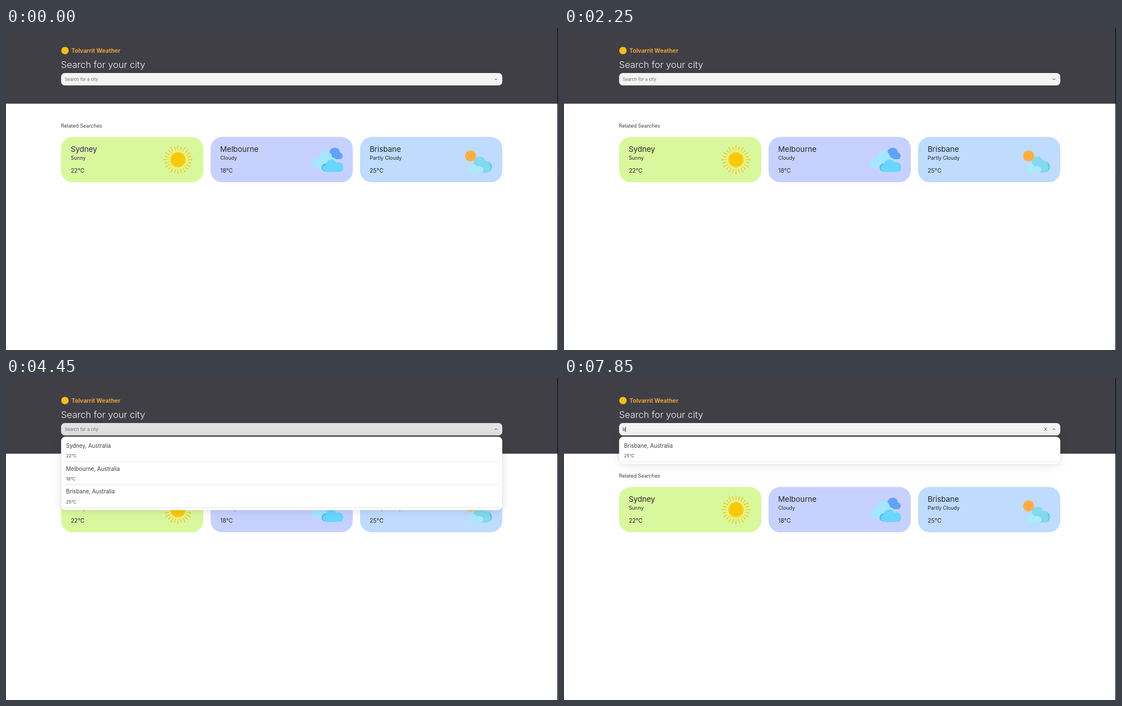
Recreate the animation shown at these times as an HTML page. Size 979 px wide and 572 px high, loop 8000 ms.

```html
<!DOCTYPE html>
<html lang="en">
<head>
<meta charset="utf-8">
<title>City weather search</title>
<style>
  html, body { margin: 0; width: 100%; height: 100%; overflow: hidden; background: #fff; }
  svg { display: block; width: 979px; height: 572px; font-family: Inter, sans-serif; fill: #27272a; }
  .brand { font-size: 10.2px; font-weight: 700; fill: #e9a23b; }
  .title { font-size: 16.4px; font-weight: 300; fill: #f4f4f5; }
  .field { font-size: 7.7px; }
  .hint { fill: #71717a; }
  .related { font-size: 8.85px; fill: #3f3f46; }
  .city { font-size: 13.35px; }
  .sky { font-size: 8.92px; }
  .temp { font-size: 10.2px; }
  .option { font-size: 9.75px; fill: #3f3f46; }
  .option-temp { font-size: 7.75px; fill: #3f3f46; }
  .rule { stroke: #e6e7ec; }
  .icon { fill: none; stroke: #3f3f46; stroke-linecap: round; stroke-linejoin: round; }
  .panel { fill: #fff; filter: drop-shadow(0 0 5px #00000008) drop-shadow(0 1px 9px #00000016) drop-shadow(0 0 .5px #0000004d); }
  #list, #match, #clear, #typed, #caret, #cursor { opacity: 0; }
  #list { transform-origin: 489px 104px; }
  #chevron { transform-origin: 869px 91px; }
</style>
</head>
<body>
<svg viewBox="0 0 979 572">
  <rect width="979" height="134.5" fill="#403f46"/>
  <circle cx="104.6" cy="40" r="6.6" fill="#f6bd1b"/>
  <text class="brand" x="116" y="43.6">Tolvarrit Weather</text>
  <text class="title" x="97.4" y="71">Search for your city</text>

  <rect id="input" x="97.7" y="80" width="782.5" height="22" rx="6.5" fill="#f4f4f5"/>
  <text id="hint" class="field hint" x="104" y="93.6">Search for a city</text>
  <text id="typed" class="field" x="104" y="93.6">b</text>
  <path id="caret" d="M109.2 86.5v9.5" stroke="#18181b" stroke-width=".9"/>
  <path id="clear" class="icon" d="M851.6 88.7l4.8 4.8m0-4.8l-4.8 4.8" stroke-width=".8"/>
  <path id="chevron" class="icon" d="M867 90.1l2 2 2-2" stroke-width="1"/>

  <text class="related" x="97.6" y="177.3">Related Searches</text>
  <g id="cards"></g>

  <g id="sun" fill="#fdc80c">
    <g id="rays"></g>
    <circle cx="305" cy="234" r="14" fill="#ffd92e"/>
    <circle cx="305" cy="234" r="12.6" fill="#ffc800"/>
  </g>

  <g id="clouds">
    <g fill="#5fa3f8">
      <circle cx="583" cy="222" r="9.5"/><circle cx="591" cy="227" r="6"/>
      <rect x="572" y="222" width="25" height="11" rx="5.5"/>
    </g>
    <g fill="#a3e6fd">
      <circle cx="567" cy="230" r="11.3"/><circle cx="552" cy="240" r="8.9"/>
      <circle cx="579" cy="237" r="7"/><rect x="544" y="236" width="40" height="13" rx="6"/>
    </g>
    <circle cx="567" cy="248" r="7.3" fill="#4dbdf2"/>
    <g fill="#69d6fd">
      <circle cx="577" cy="243.5" r="10"/><circle cx="590" cy="246.5" r="8"/>
      <rect x="562" y="243" width="36" height="12.7" rx="6.3"/>
    </g>
  </g>

  <g id="partly">
    <g id="glints" fill="#e6d9b5"></g>
    <circle cx="824" cy="227.2" r="9.8" fill="#ffad42"/>
    <circle cx="852" cy="246.7" r="10" fill="#62c8e6"/>
    <g fill="#83d9ef">
      <circle cx="840" cy="239" r="10.5"/><circle cx="849" cy="245" r="9.5"/>
      <rect x="830" y="241" width="29" height="16" rx="7"/>
    </g>
    <g fill="#a9eafb">
      <circle cx="828" cy="248" r="6.6"/><circle cx="838" cy="251" r="6"/>
      <rect x="819.5" y="246" width="27" height="11" rx="5.5"/>
    </g>
  </g>

  <g id="list"><rect class="panel" x="97.7" y="104.3" width="782.5" height="130.5" rx="7.5"/></g>
  <g id="match"><rect class="panel" x="97.7" y="104.3" width="782.5" height="48.7" rx="7.5"/></g>

  <path id="cursor" d="M0 0v9.6l2.2-2 1.6 3.6 1.6-.7-1.6-3.5h3z" fill="#fff" stroke="#27272a" stroke-width=".8"/>
  <path d="M978.5 0v572" stroke="#000"/>
</svg>
<script>
const LOOP = 8000;
const cities = [
  { name: 'Sydney', sky: 'Sunny', temp: '22°C', color: '#d9f89d' },
  { name: 'Melbourne', sky: 'Cloudy', temp: '18°C', color: '#c7d1fe' },
  { name: 'Brisbane', sky: 'Partly Cloudy', temp: '25°C', color: '#bfdbfe' },
];
const $ = id => document.getElementById(id);
const add = (id, markup) => $(id).insertAdjacentHTML('beforeend', markup);
const label = (cls, x, y, text) => `<text class="${cls}" x="${x}" y="${y}">${text}</text>`;

const card = (city, i) => {
  const x = 97.7 + i * 265.1;
  return `<g id="card${i}"><rect x="${x}" y="193.6" width="252.3" height="80.4" rx="20.4" fill="${city.color}"/>`
    + label('city', x + 17, 220.4, city.name)
    + label('sky', x + 17.2, 233.8, city.sky)
    + label('temp', x + 17.2, 256.8, city.temp) + '</g>';
};
const option = (city, i) => {
  const y = i * 40.8;
  return label('option', 106.5, 123.8 + y, `${city.name}, Australia`)
    + label('option-temp', 106.6, 140.9 + y, city.temp)
    + `<path class="rule" d="M103 ${148.5 + Math.round(y)}H875"/>`;
};
const rays = (cx, cy, count, inner, outer, half) => Array.from({ length: count }, (_, i) => {
  const tip = outer - (i % 2) * 1.6;
  return `<path transform="translate(${cx} ${cy}) rotate(${i * 360 / count})"
    d="M${-half} ${-tip}h${2 * half}l${-half * .5} ${tip - inner}h${-half}z"/>`;
}).join('');

add('cards', cities.map(card).join(''));
add('list', cities.map(option).join(''));
add('match', option(cities[2], 0));
add('rays', rays(305, 234, 24, 16.5, 25.6, 1));
add('glints', rays(824, 227.2, 12, 11.5, 14.6, .6));

// Each step: [time, properties, easing towards the next step]; a step holds by default.
const play = (id, steps) => $(id).animate(
  steps.map(([ms, props, easing = 'steps(1)']) => ({ offset: ms / LOOP, easing, ...props })),
  { duration: LOOP, iterations: Infinity });
const show = (id, ...times) => play(id, [0, ...times].map((ms, i) => [ms, { opacity: i % 2 }]));
const at = (x, y, opacity = 1) => ({ transform: `translate(${x}px, ${y}px)`, opacity });
const TYPED = 6840;

play('cursor', [
  [0, at(785, 245, 0)],
  [1240, at(785, 245), 'linear'],
  [1400, at(749.8, 155.8), 'ease-out'],
  [1640, at(722, 103)],
  [1641, at(722, 103, 0)],
]);
play('input', [
  [0, { fill: '#f4f4f5' }],
  [2750, { fill: '#f4f4f5' }, 'ease'],
  [3000, { fill: '#e2e2e4' }],
  [4690, { fill: '#e2e2e4' }, 'ease'],
  [4800, { fill: '#f4f4f5' }],
]);
play('chevron', [
  [0, { transform: 'rotate(0deg)' }],
  [3200, { transform: 'rotate(0deg)' }, 'ease'],
  [3350, { transform: 'rotate(180deg)' }],
]);
play('list', [
  [0, { opacity: 0, transform: 'scale(.85)' }],
  [3200, { opacity: 0, transform: 'scale(.85)' }, 'cubic-bezier(.165, .84, .44, 1)'],
  [3520, { opacity: 1, transform: 'scale(1)' }],
  [TYPED, { opacity: 0, transform: 'scale(1)' }],
]);
play('hint', [[0, { opacity: 1 }], [TYPED, { opacity: 0 }]]);
play('clear', [[0, { opacity: 0 }], [TYPED, { opacity: 0 }, 'ease'], [7020, { opacity: 1 }]]);
play('card0', [[0, { fill: '#30235c' }], [2060, { fill: '#27272a' }]]);
show('match', TYPED);
show('typed', TYPED);
show('caret', TYPED, 7320, 7850);
</script>
</body>
</html>
```
